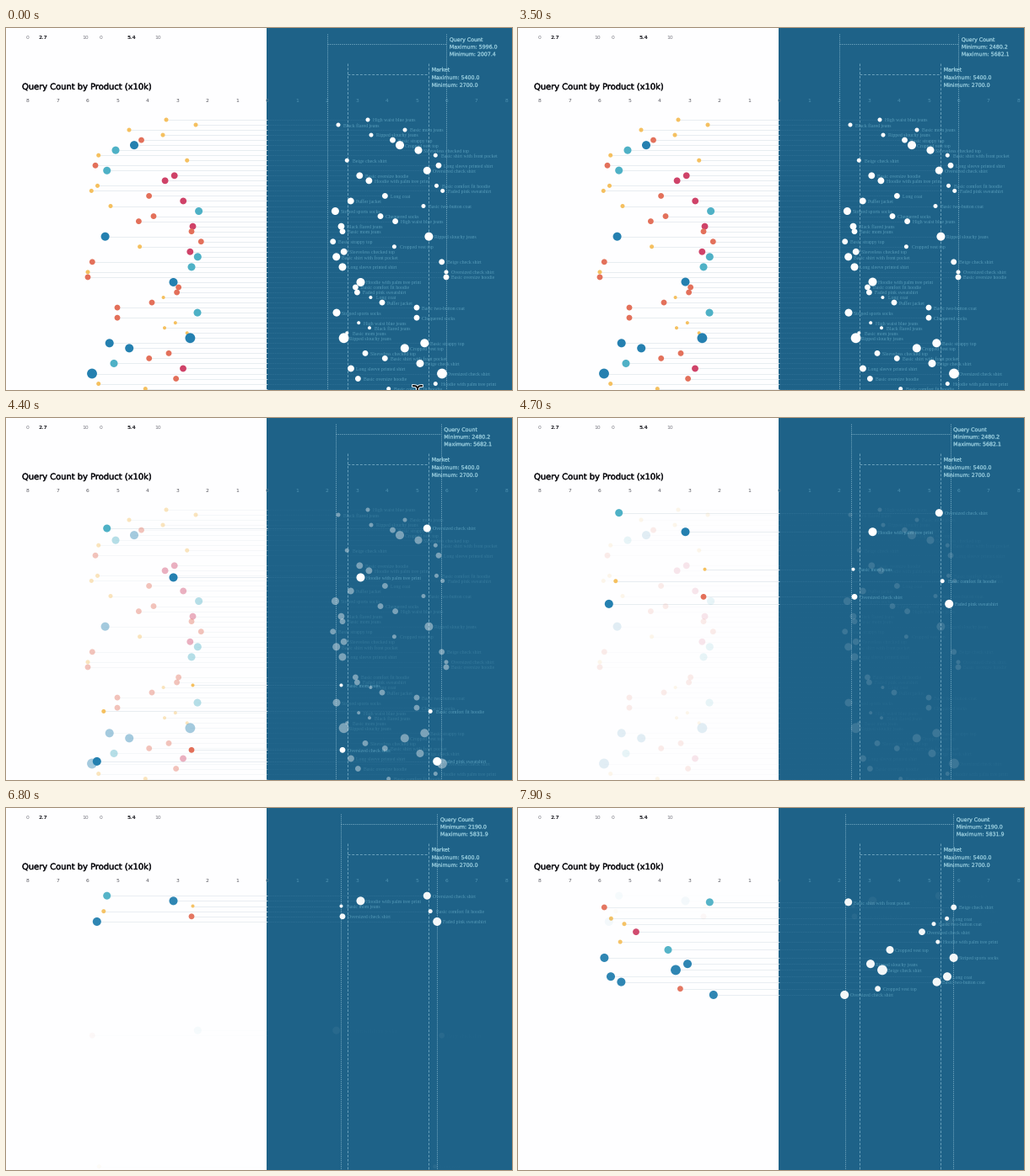
Animation of 600 by 430 pixels, one loop 8000 ms. Source, as a matplotlib script:

```python
import matplotlib.pyplot as plt
from matplotlib.animation import FuncAnimation
from matplotlib.patches import Circle, Rectangle
from matplotlib.patheffects import withStroke

W, H, DPI = 600, 430, 100
FRAMES, STEP = 80, 100
ZERO, UNIT = 309.5, 35.5
PAPER, PANEL, PALE = "#fefeff", "#1e6288", "#8fc5d8"
FIRST_START, SECOND_START, DURATION = 3338, 6350, 2000

PRODUCTS = [
    "High waist blue jeans", "Black flared jeans", "Basic mom jeans",
    "Ripped slouchy jeans", "Basic strappy top", "Cropped vest top",
    "Sleeveless checked top", "Basic shirt with front pocket",
    "Beige check shirt", "Long sleeve printed shirt",
    "Oversized check shirt", "Basic oversize hoodie",
    "Hoodie with palm tree print", "Basic comfort fit hoodie",
    "Faded pink sweatshirt", "Long coat", "Puffer jacket",
    "Basic two-button coat", "Striped sports socks", "Chequered socks"]

# Bubble kinds: colour and radius
KINDS = {"Y": ("#f5c05f", 2.0), "y": ("#f5c05f", 2.5), "r": ("#e3705a", 3.4),
         "p": ("#cf4268", 3.9), "t": ("#4eb1c6", 4.5), "b": ("#2480b0", 5.0),
         "B": ("#2480b0", 5.9)}

# Kind and horizontal place of each bubble on the left, row by row
ROWS = [
    ("y", 190), ("y", 225), ("y", 146), ("y", 186), ("r", 160.5),
    ("b", 152), ("t", 130), ("y", 109.7), ("y", 214.7), ("r", 106),
    ("t", 119.7), ("p", 199.7), ("p", 188.6), ("y", 108.5), ("y", 101.3),
    ("r", 169.6), ("p", 210.2), ("y", 124), ("t", 228.6), ("r", 175),
    ("r", 157.4), ("p", 221.5), ("r", 220), ("b", 117.6), ("r", 231.3),
    ("y", 158.6), ("p", 218.3), ("t", 227.3), ("r", 102.3), ("t", 220),
    ("y", 97), ("r", 97), ("b", 198.5), ("r", 204.6), ("r", 202.6),
    ("Y", 186.6), ("r", 173), ("r", 132), ("t", 227), ("r", 132),
    ("Y", 200.8), ("Y", 188), ("Y", 214.7), ("B", 218.4), ("b", 122.7),
    ("b", 146.2), ("r", 193), ("r", 169.7), ("t", 128), ("p", 210),
    ("B", 102), ("r", 201.6), ("y", 109.7), ("y", 165.3)]
items = dict(enumerate(ROWS))
items.update({
    55: ("y", 110.4), 57: ("y", 126), 70: ("p", 140), 82: ("Y", 221.5),
    92: ("y", 121.2), 93: ("y", 115.8), 105: ("t", 178), 110: ("r", 220),
    114: ("b", 107.8), 118: ("b", 102.4), 123: ("b", 201), 128: ("B", 187),
    135: ("b", 110), 137: ("b", 122.4), 145: ("r", 192.4), 150: ("b", 231.8)})
FIRST = [10, 32, 82, 93, 110, 114]
SECOND = [27, 28, 55, 57, 70, 92, 105, 118, 123, 128, 135, 137, 145, 150]

fig = plt.figure(figsize=(W / DPI, H / DPI), dpi=DPI, facecolor=PAPER)
ax = fig.add_axes([0, 0, 1, 1])
ax.set_xlim(0, W)
ax.set_ylim(H, 0)
ax.axis("off")


def px(size):
    return size * 72 / DPI


def text(x, y, s, size, color, ha="left", family="DejaVu Sans", heavier=0, **kw):
    artist = ax.text(x, y, s, fontsize=px(size), color=color, ha=ha,
                     va="center_baseline", family=family, **kw)
    if heavier:
        artist.set_path_effects([withStroke(linewidth=px(heavier), foreground=color)])
    return artist


def rule(color, width=0.7, style="-", z=2):
    return ax.plot([], [], color=color, lw=px(width), ls=style, zorder=z,
                   dash_capstyle="butt", solid_capstyle="butt")[0]


def ease(u):
    u = min(max(u, 0), 1)
    return 4 * u ** 3 if u < 0.5 else 1 - (2 - 2 * u) ** 3 / 2


def mix(a, b, p):
    return a + (b - a) * p


def row_y(k):
    return 109 + 6.03 * k


def sorted_y(i):
    return 104.2 + 6.15 * i


class Bubble:
    def __init__(self, k, kind, x):
        self.k = k
        self.x, self.mirror = x, 2 * ZERO - x
        color, radius = KINDS[kind]
        self.line_left = rule("#e3e9ee", 0.8)
        self.line_right = rule("#34759a", 0.7, (0, (1.5, 1.5)))
        self.label = text(0, 0, PRODUCTS[k % 20], 5.8, "#559ab8",
                          family="Liberation Serif", zorder=4)
        self.dots = [ax.add_patch(Circle((cx, 0), radius, fc=fc, lw=0, zorder=5))
                     for cx, fc in ((x, color), (self.mirror, "white"))]
        self.parts = [self.line_left, self.line_right, self.label, *self.dots]

    def state(self, p1, p2):
        y, alpha = row_y(self.k), 1 - p1
        if self.k in FIRST:
            y = mix(y, sorted_y(FIRST.index(self.k)), p1)
            alpha = 1 - p2
        elif self.k in SECOND:
            y = mix(y, sorted_y(SECOND.index(self.k)), p2)
            alpha += p2
        return y, min(alpha, 1)

    def update(self, p1, p2):
        y, alpha = self.state(p1, p2)
        for part in self.parts:
            part.set_visible(alpha > 0.002 and y < H + 8)
            part.set_alpha(alpha)
        self.line_left.set_data([self.x, ZERO], [y, y])
        self.line_right.set_data([ZERO, self.mirror], [y, y])
        self.label.set_position((self.mirror + 6.3, y + 0.4))
        for dot in self.dots:
            dot.center = dot.center[0], y


class Bracket:
    """Two vertical lines joined near the top, with a caption on the right."""

    def __init__(self, top, bar, caption_ys, style, color):
        self.top, self.bar = top, bar
        self.lines = [rule(color, 0.8, style, z=3) for _ in range(3)]
        self.captions = [text(0, y, "", 6.25, PALE, heavier=0.2, zorder=6)
                         for y in caption_ys]

    def update(self, low, high, captions):
        a, b = ZERO + UNIT * low / 1000, ZERO + UNIT * high / 1000
        self.lines[0].set_data([a, a], [self.top, H])
        self.lines[1].set_data([b, b], [self.top, H])
        self.lines[2].set_data([a, b], [self.bar, self.bar])
        for artist, s in zip(self.captions, captions):
            artist.set_text(s)
            artist.set_x(b + 3.5)


# Fixed parts
ax.add_patch(Rectangle((309, 0), W, H, fc=PANEL, lw=0, zorder=1))
for x, s, bold in ((26, "0", 0), (44, "2.7", 1), (94, "10", 0),
                   (112.5, "0", 0), (148.5, "5.4", 1), (180, "10", 0)):
    text(x, 11, s, 6, "#222228" if bold else "#777780", "center",
         weight="bold" if bold else "normal")
text(19, 69, "Query Count by Product (x10k)", 9.9, "#111116", heavier=0.4)
for n in range(-8, 9):
    color = "#55555e" if n < 0 else "#4f93b3" if n else "#5f7f92"
    text(ZERO + UNIT * n, 86, str(abs(n)), 6, color, "center")

query = Bracket(7, 18.5, (14, 22.5, 31.2), (0, (1.4, 1.6)), "#8dbdd2")
market = Bracket(42, 54.5, (49.5, 59, 68), (0, (3.6, 2.4)), "#7db0c8")
market.update(2700, 5400, ("Market", "Maximum: 5400.0", "Minimum: 2700.0"))
bubbles = [Bubble(k, *spec) for k, spec in items.items()]

# Text pointer at the lower edge
pointer = [ax.plot(xs, ys, color=c, lw=px(w), zorder=z)[0]
           for c, w, z in (("white", 3.6, 8), ("black", 1.8, 9))
           for xs, ys in (([483, 486, 488, 490, 493], [425, 425.3, 427.5, 425.3, 425]),
                          ([488, 488], [427, 434]))]


def update(frame):
    t = frame * STEP
    p1 = ease((t - FIRST_START) / DURATION)
    p2 = ease((t - SECOND_START) / DURATION)
    low = mix(mix(2007.4, 2480.2, p1), 2190.0, p2)
    high = mix(mix(5996.0, 5682.1, p1), 5831.9, p2)
    if t < FIRST_START:
        limits = ("Maximum: 5996.0", "Minimum: 2007.4")
    elif t < SECOND_START:
        limits = ("Minimum: 2480.2", "Maximum: 5682.1")
    else:
        limits = ("Minimum: 2190.0", "Maximum: 5831.9")
    query.update(low, high, ("Query Count",) + limits)
    for bubble in bubbles:
        bubble.update(p1, p2)
    for part in pointer:
        part.set_visible(frame == 0)
    return []


anim = FuncAnimation(fig, update, frames=FRAMES, interval=STEP,
                     init_func=lambda: [], repeat=True, repeat_delay=0)
plt.show()
```
